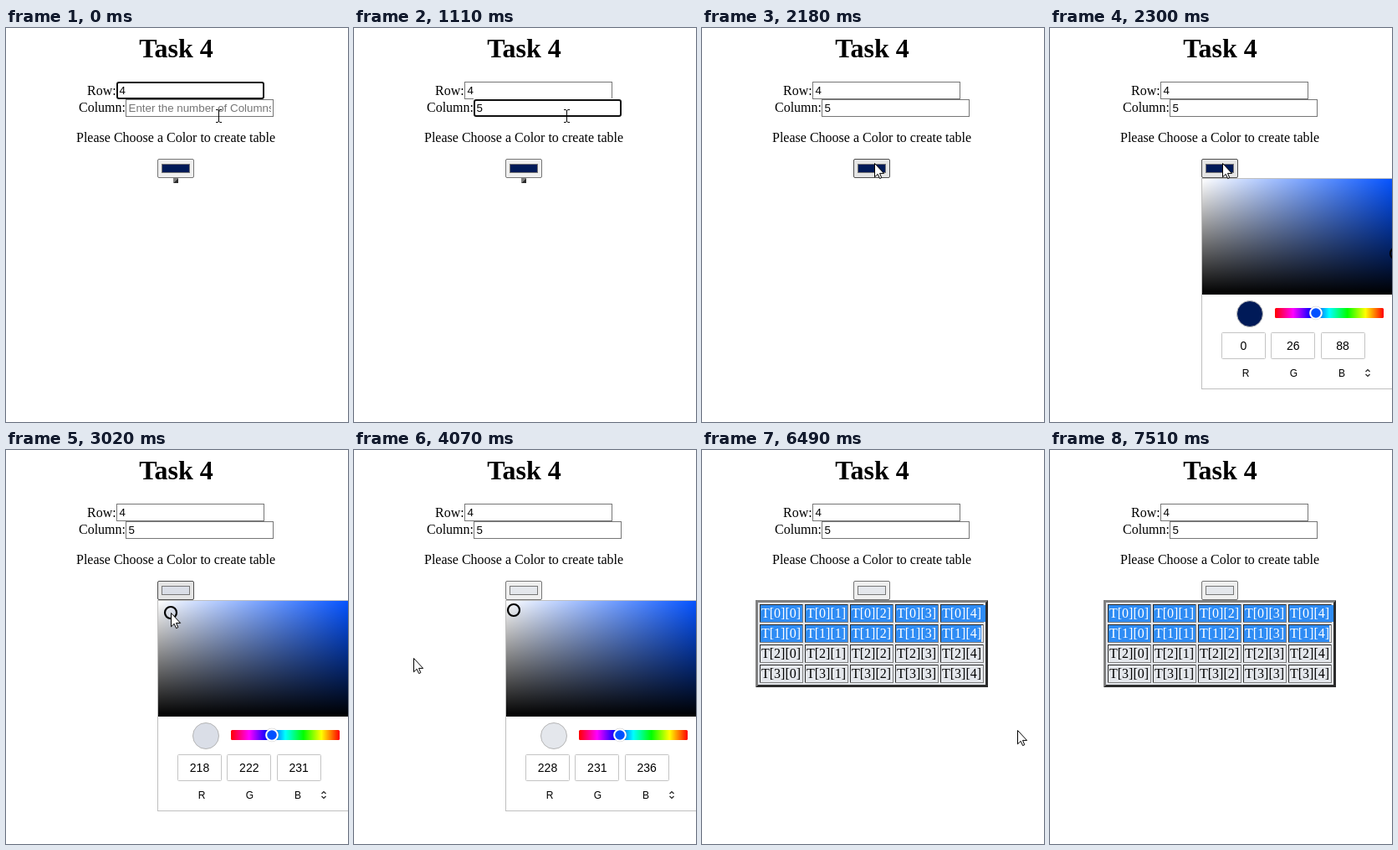
Recreate the animation shown at these times as an HTML page. Size 409 by 470 pixels, loop 7980 ms.

```html
<!DOCTYPE html>
<html lang="en">
<head>
<meta charset="utf-8">
<title>Task 4</title>
<style>
  html, body { margin: 0; width: 100%; height: 100%; overflow: hidden; background: #fff; }
  svg { display: block; }
  text { font: 16px "Liberation Serif", "Times New Roman", serif; white-space: pre; }
  .title { font-size: 32px; font-weight: bold; text-anchor: middle; }
  .field { font: 13.333px "Liberation Sans", Arial, sans-serif; }
  .hint { fill: #757575; }
  .num { font: 14px "Liberation Sans", Arial, sans-serif; text-anchor: middle; }
  .label { font: 12px "Liberation Sans", Arial, sans-serif; text-anchor: middle; }
</style>
</head>
<body>
<svg id="stage" width="409" height="470" viewBox="0 0 409 470">
  <defs>
    <linearGradient id="sat"><stop stop-color="#fff"/><stop offset="1" stop-color="#0050ff"/></linearGradient>
    <linearGradient id="dark" x2="0" y2="1"><stop stop-opacity="0"/><stop offset="1"/></linearGradient>
    <linearGradient id="hue">
      <stop stop-color="#f00"/><stop offset=".167" stop-color="#f0f"/><stop offset=".333" stop-color="#00f"/>
      <stop offset=".5" stop-color="#0ff"/><stop offset=".667" stop-color="#0f0"/>
      <stop offset=".833" stop-color="#ff0"/><stop offset="1" stop-color="#f00"/>
    </linearGradient>
    <clipPath id="hintClip"><rect x="146" y="86" width="171" height="19"/></clipPath>
  </defs>
  <rect width="409" height="470" fill="#fff"/>
  <text class="title" x="203.5" y="35">Task 4</text>
  <text x="97" y="79.5">Row:</text>
  <text x="87" y="100">Column:</text>
  <text x="84" y="136">Please Choose a Color to create table</text>
  <g id="inputs"></g>
  <text class="field" x="135.5" y="79">4</text>
  <text class="field hint" id="hint" x="146.5" y="100" clip-path="url(#hintClip)">Enter the number of Columns</text>
  <text class="field" id="five" x="146.5" y="100">5</text>
  <rect id="caret" y="88" width="1" height="15"/>
  <rect id="button" x="181.5" y="156.5" width="43" height="22" rx="1.5"/>
  <rect id="swatch" x="186.5" y="162.5" width="33" height="10" stroke="#777"/>
  <g id="empty"></g>
  <g id="table"></g>
  <g id="picker">
    <rect x="181.5" y="179.5" width="233" height="251" fill="#fff" stroke="#bfbfbf"/>
    <rect x="182" y="180" width="232" height="138" fill="url(#sat)"/>
    <rect x="182" y="180" width="232" height="138" fill="url(#dark)"/>
    <circle id="ring" r="7" fill="none" stroke="#000" stroke-width="2.2"/>
    <circle id="dot" cx="239" cy="341" r="15.5" stroke="#b5b5b5"/>
    <rect x="269" y="334" width="130" height="12" rx="1.5" fill="url(#hue)"/>
    <circle cx="318" cy="340" r="8.3" fill="#888" opacity=".45"/>
    <circle cx="318" cy="340" r="6.8" fill="#0050ff" stroke="#fff" stroke-width="2"/>
    <g id="channels"></g>
    <path d="M377.5 410l2.5-2.5 2.5 2.5M377.5 413l2.5 2.5 2.5-2.5" fill="none" stroke="#222" stroke-width="1.2"/>
  </g>
  <path id="arrow" d="M.5.5V16.8L4.2 13.3 6.6 18.6 8.8 17.6 6.5 12.4H11.6Z" fill="#fff" stroke="#000"/>
  <path id="beam" d="M-3-7.5H-1L.5-6.5 2-7.5H4M.5-6.5V6.5M-3 7.5H-1L.5 6.5 2 7.5H4" fill="none" stroke="#000"/>
</svg>
<script>
const LOOP = 7980;
const NAVY = [0, 26, 88];
const $ = id => document.getElementById(id);

// Pointer steps: time, x, y, shape
const POINTER = [
  [0, 254, 105, 'beam'], [1240, 252, 118, 'beam'], [1360, 247, 132, 'beam'],
  [1510, 235, 146, 'arrow'], [1630, 225, 151, 'arrow'], [1760, 216, 155, 'arrow'],
  [1880, 210, 157, 'arrow'], [2030, 206, 161, 'arrow'], [2440, 206, 179, 'arrow'],
  [2570, 206, 194, 'arrow'], [2870, 201, 194, 'arrow'], [3020, 197, 194, 'arrow'],
  [3140, 196, 193, 'arrow'], [3260, 194, 192, 'arrow'], [3380, 192, 191, 'arrow'],
  [3520, 191, 191, 'arrow'], [3930, 107, 229, 'arrow'], [4070, 71, 248, 'arrow'],
  [4510, 73, 249, 'beam'], [5100, 115, 290, 'arrow'], [5220, 158, 331, 'arrow'],
  [5370, 164, 336, 'arrow'], [6490, 377, 334, 'arrow'], [6640, 0, 0, 'none'],
  [7050, 408, 434, 'arrow'], [7210, 404, 439, 'arrow'], [7360, 390, 469, 'arrow'],
  [7510, 0, 0, 'none']
];

const rect = (x, y, w, h, fill) => `<rect x="${x}" y="${y}" width="${w}" height="${h}" fill="${fill}"/>`;
const pointerAt = t => POINTER.findLast(p => p[0] <= t);
const show = (id, on) => $(id).setAttribute('visibility', on ? 'visible' : 'hidden');
const set = (id, attrs) => { for (const k in attrs) $(id).setAttribute(k, attrs[k]); };
const within = (t, a, b) => t >= a && t < b;
const css = c => `rgb(${c})`;

function colorAt(x, y) {
  const s = (x - 182) / 266, v = 255 * (1 - (y - 180) / 148);
  return [1 - s, 1 - s * .685, 1].map(k => Math.round(v * k));
}

function input(x, y, name) {
  return `<rect x="${x + .5}" y="${y + .5}" width="176" height="20" fill="#fff" stroke="#767676"/>
    <g id="${name}">${rect(x, y - 1, 177, 22, '#fff')}
    <rect x="${x + 1}" y="${y + 1}" width="175" height="19" rx="2" fill="#fff" stroke="#101010" stroke-width="2"/></g>`;
}

// Outset frame with mitred corners
function frame(x, y, w, h, b) {
  return `<path fill="#808080" d="M${x} ${y}h${w}l${-b} ${b}h${2 * b - w}v${h - 2 * b}l${-b} ${b}z"/>
    <path fill="#2c2c2c" d="M${x + w} ${y + h}h${-w}l${b} ${-b}h${w - 2 * b}v${2 * b - h}l${b} ${-b}z"/>`;
}

function cell(r, c) {
  const x = 69 + 54 * c, y = 184 + 24 * r, picked = r < 2;
  let s = rect(x, y, 52, 22, '#808080') + rect(x, y, 51, 21, '#2c2c2c') + rect(x + 1, y + 1, 50, 20, '#e4e7ec');
  if (picked) s += rect(x + 1, y + 1, c < 4 ? 50 : r ? 48 : 53, 20, '#2f8cf4');
  return s + `<text x="${x + 2}" y="${y + 16}" fill="${picked ? '#fff' : '#000'}">T[${r}][${c}]</text>`;
}

function build() {
  $('inputs').innerHTML = input(132, 64, 'rowFocus') + input(143, 85, 'colFocus');
  $('empty').innerHTML = frame(200, 179, 6, 6, 3);
  let table = rect(64, 179, 278, 104, '#e4e7ec') + frame(64, 179, 278, 104, 3);
  for (let i = 0; i < 20; i++) table += cell(Math.floor(i / 5), i % 5);
  $('table').innerHTML = table;
  $('channels').innerHTML = [...'RGB'].map((name, i) => {
    const x = 205.5 + 59.3 * i;
    return `<rect x="${Math.floor(x) + .5}" y="363.5" width="52" height="31" rx="1" fill="#fff" stroke="#c4c4c4"/>
      <text class="num" id="num${i}" x="${x + 26}" y="384">0</text>
      <text class="label" x="${234 + 57.5 * i}" y="416">${name}</text>`;
  }).join('');
}

function draw(t) {
  show('rowFocus', t < 130);
  show('colFocus', within(t, 130, 2030));
  show('hint', t < 690);
  show('five', t >= 690);
  show('caret', within(t, 130, 1110) || within(t, 1630, 2030));
  set('caret', { x: t < 690 ? 147 : 154 });
  show('empty', t < 2180);
  show('picker', within(t, 2300, 4510));
  show('table', t >= 4510);

  const [, x, y, shape] = pointerAt(t);
  for (const id of ['arrow', 'beam']) {
    show(id, shape === id);
    set(id, { transform: `translate(${x} ${y})` });
  }

  const [, rx, ry] = pointerAt(Math.min(t, 3520));
  const chosen = t >= 2720;
  const color = chosen ? colorAt(rx, ry) : NAVY;
  set('ring', chosen ? { cx: rx, cy: ry } : { cx: 414, cy: 269 });
  set('dot', { fill: css(color) });
  color.forEach((v, i) => { $('num' + i).textContent = v; });

  const hover = within(t, 2030, 3930);
  set('button', { fill: hover ? '#e5e5e5' : '#efefef', stroke: hover ? '#4f4f4f' : '#767676' });
  set('swatch', { fill: css(!chosen ? NAVY : t < 3930 ? colorAt(197, 194) : color) });
}

build();
const start = performance.now();
function tick() {
  draw((performance.now() - start) % LOOP);
  requestAnimationFrame(tick);
}
tick();
</script>
</body>
</html>
```
